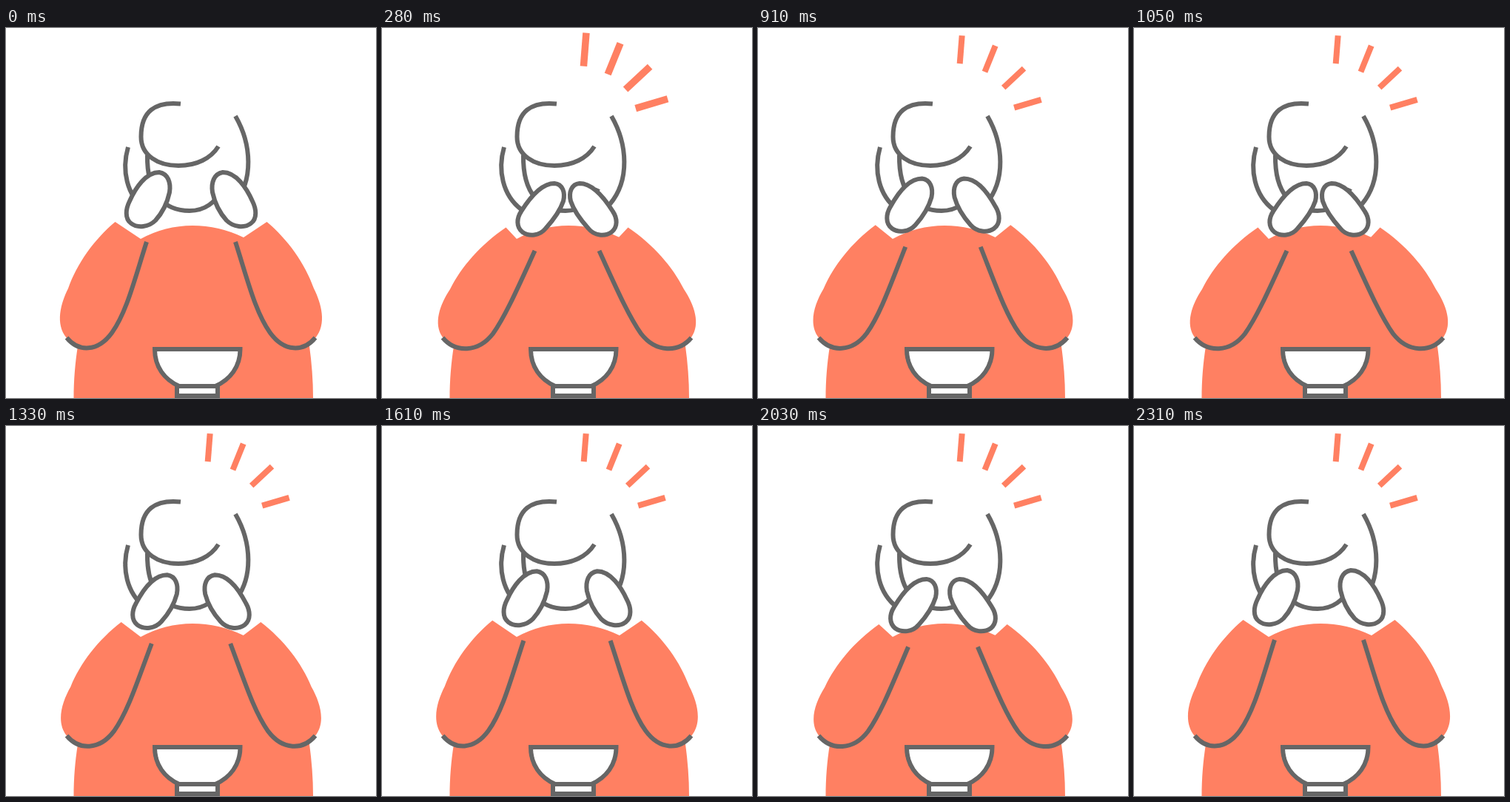
An HTML page that plays this animation: 500 by 500 pixels, repeating every 2940 ms.

```html
<!DOCTYPE html>
<html lang="en">
<head>
<meta charset="utf-8">
<title>Clapping before a meal</title>
<style>
html, body { margin: 0; height: 100%; overflow: hidden; background: #fff; }
svg { display: block; width: 100vw; height: 100vh; }
.skin { fill: #ff8062; }
.line { fill: none; stroke: #666; stroke-width: 6; }
.white { fill: #fff; }
#rays path { stroke: #ff8062; stroke-width: 8; }
</style>
</head>
<body>
<svg viewBox="0 0 500 500">
  <defs>
    <g id="side">
      <path id="arm" class="skin"/>
      <path id="sleeve" class="line"/>
      <path id="hand" class="line white"/>
    </g>
  </defs>
  <path class="skin" d="M91.500 500C91.500 476 93.500 452 97 430L110 400L182 285Q215 267 252 267Q288 267 321 283L390 400L410 430C413 452 415 476 415 500Z"/>
  <g class="line">
    <path d="M165 161C156 192 163 226 188 245"/>
    <path d="M310 119C332 157 335 206 308 238"/>
    <path d="M191 172C190 225 215 247 248 247C268 247 284 236 292 217"/>
    <path d="M236 102.500C201 99 182.500 113 182.500 147C182.500 172 205 186 233 186C258 186 277 176 287 160"/>
  </g>
  <use href="#side"/>
  <use href="#side" transform="translate(500) scale(-1 1)"/>
  <g class="line white">
    <path d="M201 434H316.500C316.500 458 303 475 283 484H234C214 475 201 458 201 434Z"/>
    <path d="M231 484H286V497H231Z"/>
  </g>
  <g id="rays">
    <path d="M-19 0H19"/><path d="M-19 0H19"/><path d="M-19 0H19"/><path d="M-19 0H19"/>
  </g>
</svg>
<script>
const STEP = 70, LOOP = 2940, CLAP = 2300 / 3;
const $ = id => document.getElementById(id);
const clamp = x => Math.min(1, Math.max(0, x));
const lerp = (a, b, p) => a + (b - a) * p;
const cubic = x => x < .5 ? 4 * x ** 3 : 1 - 4 * (1 - x) ** 3;
const wave = x => (1 - Math.cos(Math.PI * x)) / 2;

// Each shape: hands apart, hands together
const outer = ["M147.5 262C119 286 96 318 84 352C74 372 66 400 82 419",
               "M167.5 269.5C133 293 107 323 92 353C78 374 69 400 82 418"];
const under = ["C98 438 124 438 143 412C163 384 173 342 190 289",
               "C99 439 130 439 150 413C167 389 184 350 206.5 301"];
const hand = ["M207 195C219 197 223 209 221 222C218 236 211 250 202 260C193 269 178 271 169 264C160 257 162 244 167 234C175 216 189 195 207 195Z",
              "M233 210C244 211 248 222 245 234C241 246 231 260 221 271C213 281 199 282 190 276C181 269 182 257 188 248C198 232 214 210 233 210Z"];

// x, y, angle
const rays = [[274.2, 29.2, 94.5], [313.6, 41.6, 112], [345.6, 67.6, 137], [364.4, 102.2, 163.5]];
// time, scale
const pops = [[130, 0], [290, 1.2], [600, .88], [900, 1]];

function mix([a, b], p) {
  const ends = b.match(/[\d.]+/g);
  let i = 0;
  return a.replace(/[\d.]+/g, n => lerp(+n, +ends[i++], p).toFixed(2));
}

function closeness(t) {
  if (t >= 3 * CLAP) return 0;
  t %= CLAP;
  return cubic(clamp(t / 275)) - cubic(clamp((t - 340) / 420));
}

function rayScale(t) {
  let s = 0;
  for (let i = 1; i < pops.length; i++) {
    const [t0, s0] = pops[i - 1], [t1, s1] = pops[i];
    s += (s1 - s0) * wave(clamp((t - t0) / (t1 - t0)));
  }
  return s;
}

function draw(t) {
  const p = closeness(t), s = rayScale(t);
  const edge = mix(outer, p), seam = mix(under, p);
  $("arm").setAttribute("d", edge + seam + "L182 285Z");
  $("sleeve").setAttribute("d", "M82 418.5" + seam);
  $("hand").setAttribute("d", mix(hand, p));
  [...$("rays").children].forEach((ray, i) => {
    const [x, y, angle] = rays[i];
    ray.setAttribute("transform", `translate(${x} ${y}) rotate(${angle}) scale(${s})`);
  });
  $("rays").style.display = s > 0 ? "" : "none";
}

const start = performance.now();
function tick(now) {
  const t = Math.max(0, now - start) % LOOP;
  draw(Math.floor(t / STEP) * STEP);
  requestAnimationFrame(tick);
}
draw(0);
requestAnimationFrame(tick);
</script>
</body>
</html>
```
